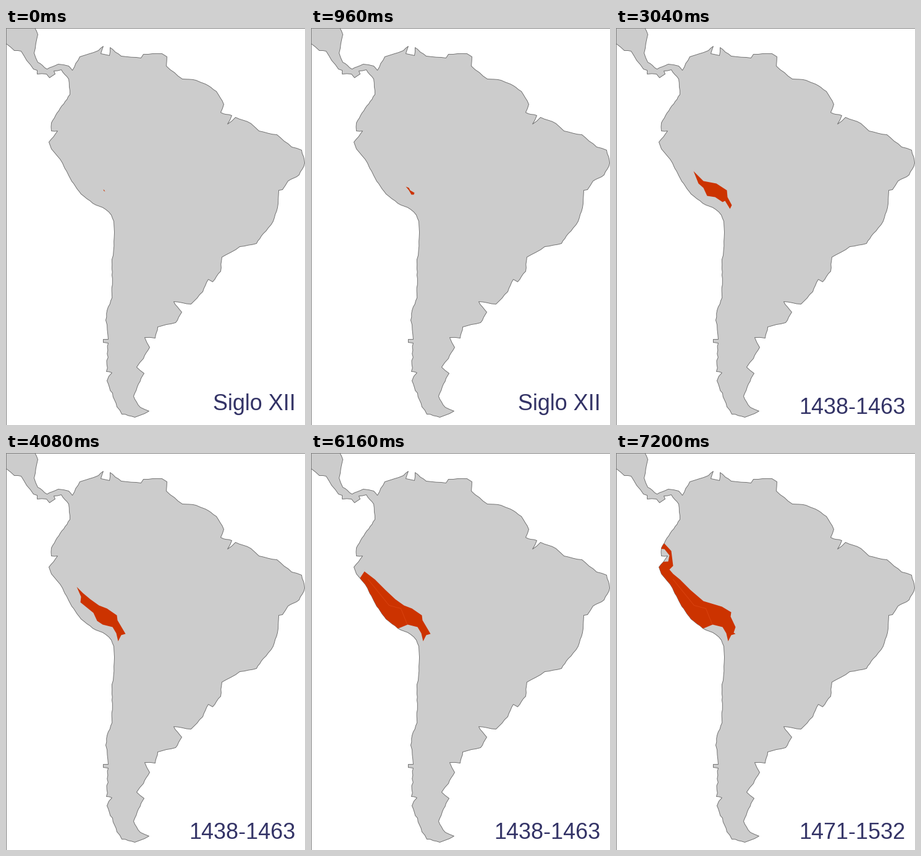
A matplotlib script for the animation above (8 s loop, 484 px wide and 642 px high).

```python
import math
import random

import matplotlib.pyplot as plt
from matplotlib.animation import FuncAnimation
from matplotlib.patches import Polygon

W, H, DPI = 484, 642, 100
STEP, LOOP = 80, 8000
PX = 72 / DPI
LAND, COAST, FRAME, RED, SEAM, INK = (
    "#cccccc", "#6a6a6a", "#808080", "#cc3300", "#d9420f", "#333366")

# Capes and bays only; roughen() supplies the small jags between them.
PACIFIC = [
    (0, 25), (13, 36), (24, 37), (33, 52), (44, 66), (50, 68), (50, 74), (65, 74),
    (70, 80), (79, 74), (77, 69), (89, 67), (101, 82), (103, 107), (82, 137),
    (73, 153), (73, 166), (83, 166), (69, 184), (73, 195), (91, 218), (109, 251),
    (121, 268), (140, 283), (161, 293), (170, 302), (174, 312)]
FJORDS = [
    (175, 330), (171, 389), (171, 430), (161, 472), (165, 503), (157, 503),
    (157, 508), (165, 509), (162, 555), (171, 557), (163, 570), (172, 590),
    (179, 612), (187, 624), (208, 629)]
ATLANTIC = [
    (216, 626), (231, 619), (217, 613), (206, 595), (214, 575), (223, 558),
    (211, 548), (222, 534), (232, 516), (224, 500), (241, 501), (245, 483),
    (274, 476), (284, 459), (271, 442), (299, 446), (318, 426), (327, 406),
    (334, 410), (347, 393), (349, 370), (378, 353), (405, 348), (416, 332),
    (432, 312), (439, 290), (441, 262), (447, 261), (456, 247), (474, 237),
    (483, 218), (478, 197), (462, 192), (438, 172), (409, 166), (396, 154),
    (371, 144), (358, 155), (365, 141), (347, 136), (352, 123), (340, 102),
    (322, 90), (307, 84), (285, 82), (259, 61), (260, 46), (252, 41), (222, 42),
    (218, 48), (186, 45), (168, 31), (167, 44), (153, 41), (157, 29), (149, 36),
    (119, 46), (107, 68), (101, 61), (84, 58), (66, 66), (51, 55), (45, 40),
    (51, 10), (46, -1)]

# Borders that several stages share; whatever lies at sea is clipped by the coast.
EAST = [(136, 236), (150, 246), (163, 251), (179, 262), (180, 270), (193, 292)]
SOUTH = [(186, 294), (181, 304), (178, 291), (172, 281), (156, 277)]
INLAND = [(120, 241), (121, 232)]
AT_SEA = [(139, 284), (100, 275)]

SEED = [(157, 261), (158, 261), (160, 264), (158, 263)]
VALLEY = [(153, 256), (158, 258), (160, 262), (167, 266), (166, 269), (162, 269),
          (158, 262)]
RIDGE = [(131, 245), (155, 251), (160, 262), (172, 270), (175, 279), (172, 281),
         (156, 268), (138, 254)]
HIGHLAND = [(125, 231), (141, 247), (162, 251), (179, 262), (180, 273), (187, 286),
            (184, 292), (176, 279), (172, 281), (160, 273), (147, 271), (141, 258),
            (133, 251)]
LAKE = [(114, 216), (124, 226)] + EAST + SOUTH + [(147, 271), (141, 258)] + INLAND
COASTAL = ([(106, 203), (121, 215), (124, 226)] + EAST + SOUTH + AT_SEA
           + [(119, 262), (126, 246)] + INLAND + [(111, 224)])
DESERT = [(86, 191), (103, 204), (120, 221)] + EAST + SOUTH + AT_SEA + [(70, 215)]
EMPIRE = ([(92, 195), (103, 204), (120, 221), (141, 239), (171, 248), (186, 257),
           (185, 264), (193, 281), (190, 290), (193, 292)] + SOUTH + AT_SEA
          + [(60, 215), (60, 176), (84, 175), (86, 165), (78, 155), (68, 154),
             (77, 145), (89, 158), (92, 182), (86, 188)])
PROVINCE_LINE = [(92, 204), (126, 246), (145, 251), (155, 276)]

EARLY = ("Siglo XII", 334.5, 617)
MIDDLE = ("1438-1463", 295.5, 623.5)
LATE = ("1471-1532", 295.5, 623.5)

# start in ms, territory, label
STAGES = [
    (0, SEED, EARLY), (960, VALLEY, EARLY), (2000, RIDGE, EARLY),
    (3040, HIGHLAND, MIDDLE), (4080, LAKE, MIDDLE), (5120, COASTAL, MIDDLE),
    (6160, DESERT, MIDDLE), (7200, EMPIRE, LATE)]
PROVINCES_FROM = 5120


def roughen(points, amount, rng):
    """Split long edges at midpoints nudged sideways by up to amount pixels."""
    result = [points[0]]
    for a, b in zip(points, points[1:]):
        dx, dy = b[0] - a[0], b[1] - a[1]
        length = math.hypot(dx, dy)
        if length > 9:
            nudge = rng.uniform(-amount, amount) / length
            middle = ((a[0] + b[0]) / 2 - dy * nudge, (a[1] + b[1]) / 2 + dx * nudge)
            result += roughen([a, middle, b], amount, rng)[1:]
        else:
            result.append(b)
    return result


rng = random.Random(4)
outline = [(-1, -1)]
for shore, amount in ((PACIFIC, 0.7), (FJORDS, 1.4), (ATLANTIC, 0.7)):
    outline += roughen(shore, amount, rng)

fig = plt.figure(figsize=(W / DPI, H / DPI), dpi=DPI, facecolor="white")
ax = fig.add_axes([0, 0, 1, 1])
ax.set_xlim(-0.5, W - 0.5)
ax.set_ylim(H - 0.5, -0.5)
ax.axis("off")

land = ax.add_patch(Polygon(outline, fc=LAND, ec=COAST, lw=0.9 * PX))
ax.plot([0, 0, W], [H, 0, 0], color=FRAME, lw=PX, snap=False)
territory = ax.add_patch(Polygon(SEED, fc=RED, lw=0, zorder=3))
territory.set_clip_path(land)
provinces, = ax.plot(*zip(*PROVINCE_LINE), color=SEAM, lw=PX, zorder=4)
provinces.set_clip_path(territory)
label = ax.text(0, 0, "", color=INK, fontsize=36 * PX, family="Liberation Sans",
                va="baseline", ha="left")


def draw(frame):
    now = frame * STEP
    _, shape, (text, x, y) = [stage for stage in STAGES if stage[0] <= now][-1]
    territory.set_xy(shape)
    provinces.set_visible(now >= PROVINCES_FROM)
    label.set_text(text)
    label.set_position((x, y))
    return territory, provinces, label


anim = FuncAnimation(fig, draw, frames=LOOP // STEP, interval=STEP,
                     repeat=True, repeat_delay=0, blit=False)
plt.show()
```
